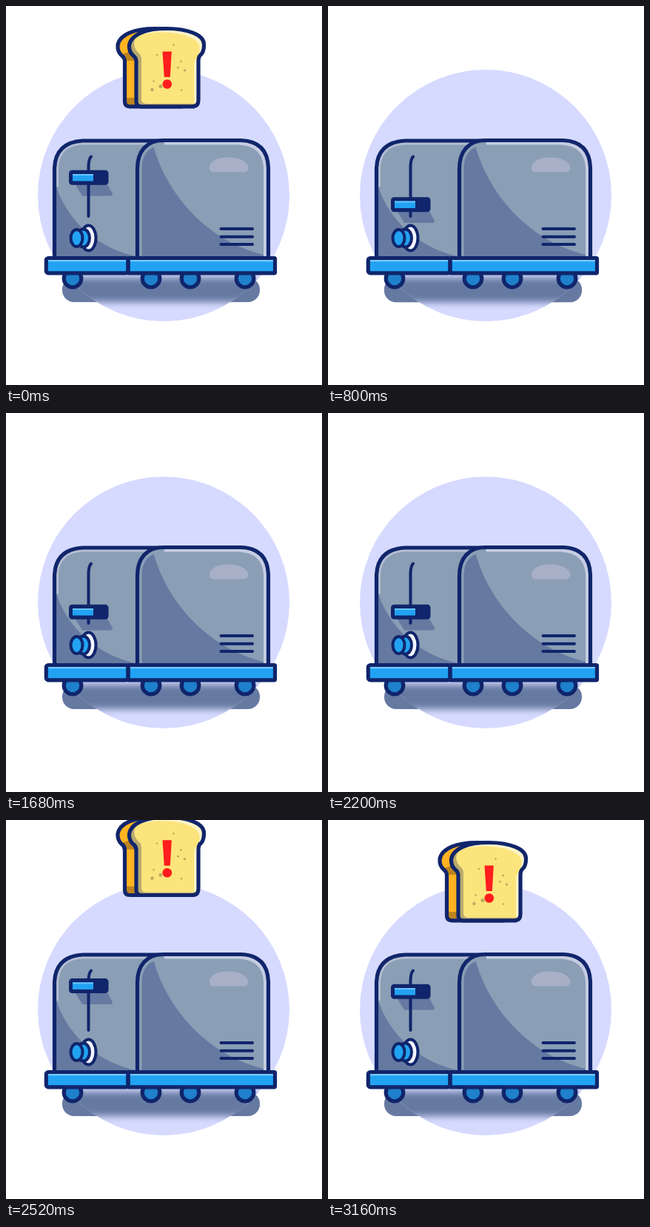
An HTML page that plays this animation: 427x512 px, repeating every 3200 ms.

```html
<!DOCTYPE html>
<html lang="en">
<head>
<meta charset="utf-8">
<title>Toaster</title>
<style>
  html, body { margin: 0; width: 100%; height: 100%; overflow: hidden; background: #fff; }
  svg { display: block; width: 100%; height: 100%; }
  .line { fill: none; stroke: #10256b; stroke-width: 5.2; stroke-linecap: round; stroke-linejoin: round; }
  .thin { stroke-width: 4; }
  .blue { fill: #22a2f2; }
  .foot { fill: #1f80cb; }
  .dark { fill: #6679a1; }
  .metal { fill: #8a9eb5; }
  .rim { fill: none; stroke: #c6cde2; stroke-width: 5; }
</style>
</head>
<body>
<svg viewBox="0 0 427 512">
  <defs>
    <path id="slice" d="M176 129V75Q176 70 172 67Q166 62 166.500 53C169 38 190 30.500 217 30.500C246 30.500 267.500 39 267.500 52Q267.500 61 264 65Q260 68 260 74V127Q260 135.800 252 135.800H183Q176 135.800 176 129Z"/>
    <path id="side" d="M65.500 342V219Q67 184 104 182H216V342Z"/>
    <path id="front" d="M177.500 342V220C177.500 196 190 181.500 213 181.500H318Q353 183 354.500 218V342Z"/>
    <clipPath id="sliceClip"><use href="#slice"/></clipPath>
    <clipPath id="sideClip"><use href="#side"/></clipPath>
    <clipPath id="frontClip"><use href="#front"/></clipPath>
    <clipPath id="discClip"><circle cx="213" cy="256" r="170"/></clipPath>
    <filter id="soft" x="-20%" y="-60%" width="140%" height="220%"><feGaussianBlur stdDeviation="5"/></filter>
  </defs>

  <rect class="dark shadow" x="76" y="367" width="267" height="33" rx="16"/>
  <circle cx="213" cy="256" r="170" fill="#d6daff"/>
  <g clip-path="url(#discClip)">
    <g filter="url(#soft)"><rect class="dark shadow" x="76" y="367" width="267" height="33" rx="16"/></g>
  </g>

  <g id="bread">
    <g transform="translate(-15.500 0)">
      <use href="#slice" fill="#ffb320"/>
      <g clip-path="url(#sliceClip)" fill="#bd8420">
        <path d="M176 124H200V137H176Z"/>
        <path d="M170 66L192 58V74H174Z"/>
      </g>
      <use href="#slice" class="line"/>
    </g>
    <use href="#slice" fill="#b9aa6c"/>
    <g clip-path="url(#sliceClip)">
      <g transform="translate(7 -4)" clip-path="url(#sliceClip)">
        <rect x="150" y="20" width="130" height="130" fill="#fff4c8"/>
        <use href="#slice" transform="translate(-13 9)" fill="#fbe47b"/>
      </g>
    </g>
    <use href="#slice" class="line"/>
    <g id="crumbs" fill="#bcab62"></g>
    <path d="M211.500 61.500H223.800L221.800 96H213.800Z" fill="#ff1d1d"/>
    <circle cx="217.800" cy="105.500" r="6.300" fill="#ff1d1d"/>
  </g>

  <g id="feet"></g>

  <use href="#side" class="metal"/>
  <g clip-path="url(#sideClip)">
    <path class="dark" d="M66 238C80 287 121 328 180 339V342H66Z"/>
    <path class="rim" style="stroke:#b4bed2;stroke-width:4" d="M69 244V219Q70 187 104 185.500H192"/>
  </g>
  <use href="#side" class="line"/>

  <use href="#front" class="metal"/>
  <g clip-path="url(#frontClip)">
    <path class="dark" d="M177 181H196L199.500 190C216 250 268 318 352 337V342H177Z"/>
    <path class="rim" style="stroke:#8a9eb5" d="M181 342V220C181 199 192 185.500 214 185.500"/>
    <path class="rim" d="M214 185H315Q349 187 350.500 218V342"/>
  </g>
  <use href="#front" class="line"/>
  <path d="M280 224.500Q274 224 275 216Q280 204.500 300 204.500Q321 204.500 327 216Q329 224 321 224.500Z" fill="#a8b0c8"/>
  <path class="line thin" d="M290.500 301H333M290.500 311.700H333M290.500 322H333"/>

  <path class="dark lever" d="M93 240H136.500L144 253.500Q144 256.500 141 256.500H103Z"/>
  <path class="line thin" d="M111.500 284V216Q112 206 115 203.500"/>
  <g class="lever">
    <rect x="85" y="221.700" width="53.500" height="20" rx="4.500" fill="#10256b"/>
    <path class="blue" d="M90 227H118V236.500H90Z"/>
    <path fill="#69c4ff" d="M90 227H118V229H90Z"/>
  </g>

  <g class="line thin">
    <ellipse cx="111.500" cy="313.500" rx="10" ry="17" fill="#f2f4ff"/>
    <ellipse class="blue" cx="104.500" cy="313.500" rx="8.500" ry="12"/>
    <ellipse class="blue" cx="95.500" cy="313.500" rx="8" ry="11.500"/>
  </g>

  <rect class="blue" x="54.300" y="340.500" width="110.700" height="20.300" rx="3"/>
  <rect class="blue" x="165" y="340.500" width="198.500" height="20.300" rx="1"/>
  <path stroke="#79c9ff" stroke-width="2.500" d="M57 344H163M167 344H361"/>
  <rect class="line" x="54.300" y="340.500" width="110.700" height="20.300" rx="3"/>
  <rect class="line" x="165" y="340.500" width="198.500" height="20.300" rx="1"/>
</svg>

<script>
const LOOP = 3200, BREAD_DROP = 167, LEVER_DROP = 37;
// [time, value] steps: 0 is up, 1 is pressed down
const PRESS = [[0, 0], [900, 1], [2240, 1], [2390, -0.369], [2720, 0], [LOOP, 0]];
const SPREAD = [[0, 0], [300, 0], [540, 1], [900, 0], [2240, 0], [2300, 1], [2380, 0], [LOOP, 0]];
const CRUMBS = [[204, 66, 1.3], [226.5, 52.5, 1.3], [236.5, 75, 1.4], [241.5, 87, 1.7], [232.5, 83.5, 1.4],
  [237, 113.5, 1.3], [197.5, 113, 2.2], [209, 108.5, 2.5], [199.5, 101.5, 1.3]];

const byId = id => document.getElementById(id);
const bread = byId('bread');
const levers = document.querySelectorAll('.lever');
const shadows = document.querySelectorAll('.shadow');

function addCircle(parent, cx, cy, r, cls) {
  const c = document.createElementNS('http://www.w3.org/2000/svg', 'circle');
  const attrs = { cx, cy, r, class: cls };
  for (const k in attrs) c.setAttribute(k, attrs[k]);
  parent.append(c);
}
CRUMBS.forEach(([x, y, r]) => addCircle(byId('crumbs'), x, y, r, ''));
[90, 196, 249, 323].forEach(x => {
  addCircle(byId('feet'), x, 368, 11.8, 'foot');
  addCircle(byId('feet'), x, 368, 11.8, 'line');
});

// cubic-bezier(.4, 0, .4, 1), solved by bisection
function ease(x) {
  let lo = 0, hi = 1;
  for (let i = 0; i < 24; i++) {
    const s = (lo + hi) / 2;
    if (1.2 * s * (1 - s) + s ** 3 < x) lo = s; else hi = s;
  }
  return lo * lo * (3 - 2 * lo);
}

function valueAt(steps, t) {
  const i = steps.findIndex(([end], n) => n && t <= end);
  const [t0, a] = steps[i - 1], [t1, b] = steps[i];
  return a === b ? a : a + (b - a) * ease((t - t0) / (t1 - t0));
}

function moveDown(el, y) {
  el.setAttribute('transform', `translate(0 ${y})`);
}

function draw(t) {
  const p = valueAt(PRESS, t), grow = 1.6 * valueAt(SPREAD, t);
  moveDown(bread, p * BREAD_DROP);
  levers.forEach(el => moveDown(el, p * LEVER_DROP));
  shadows.forEach(s => {
    s.setAttribute('x', 76 - grow);
    s.setAttribute('width', 267 + 2 * grow);
    s.setAttribute('height', 33 + grow);
  });
}

const start = performance.now();
function tick() {
  draw((performance.now() - start) % LOOP);
  requestAnimationFrame(tick);
}
tick();
</script>
</body>
</html>
```
